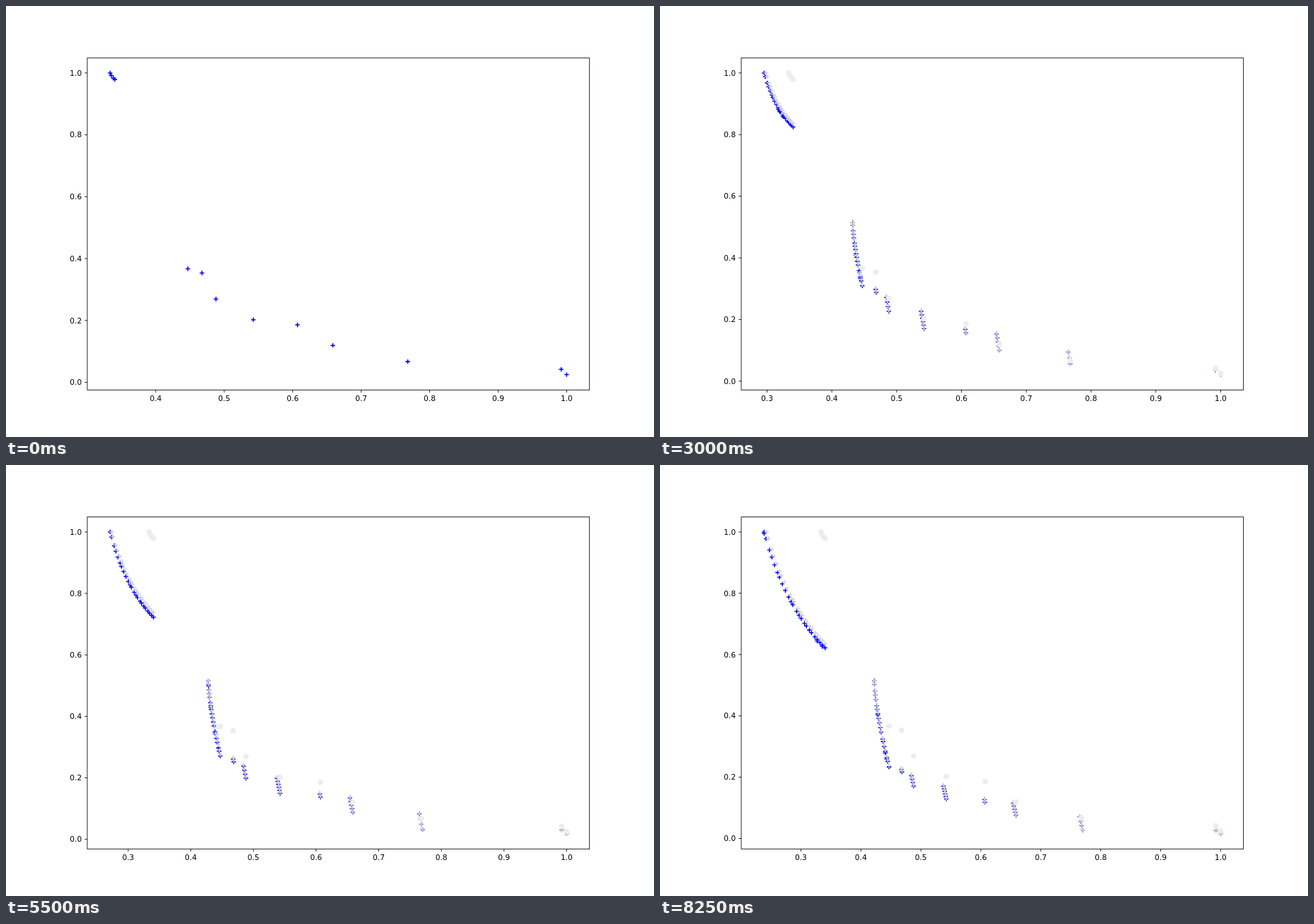
Animation of 917x611 px, one loop 8.5 s. Source, as an HTML page with a canvas:

```html
<!DOCTYPE html>
<html lang="en">
<head>
<meta charset="utf-8">
<title>Advancing front</title>
<style>
  html, body { margin: 0; width: 100%; height: 100%; overflow: hidden; background: #fff; }
  canvas { display: block; }
</style>
</head>
<body>
<canvas id="plot" width="917" height="611"></canvas>
<script>
const ctx = document.getElementById('plot').getContext('2d');
const STEP = 250, FRAMES = 34;
const BOX = { left: 115, top: 73.7, right: 825.7, bottom: 544.3 };
const LEFT_END = .3403, MIDDLE_END = .447, LOWEST = .0255;

// Progress of the front: step, smallest x, height scale
const KEYS = [
  [0, .3335, .979], [9, .3043, .857], [15, .2868, .792], [18, .2793, .768], [19, .2793, .768],
  [24, .2659, .692], [25, .2659, .692], [27, .2595, .677], [28, .2595, .69], [33, .2387, .622]
];

// Small columns: x, height, final count, gap, first step
const COLUMNS = [
  [.4676, .361, 2, -.012, 0], [.488, .275, 4, .018, 0], [.5425, .207, 6, .0135, 0],
  [.607, .19, 2, .014, 0], [.6586, .122, 5, .016, 0], [.768, .0685, 3, .023, 0],
  [.77, .0445, 1, 0, 15], [.992, .043, 1, 0, 0], [1, LOWEST, 1, 0, 0]
];

const mix = (a, b, f) => a + (b - a) * f;
const grow = (from, to, step, pace) => Math.round(mix(to, from, Math.exp(-step / pace)));

function random(n) {
  const r = Math.sin(n * 12.9898) * 43758.5453;
  return r - Math.floor(r);
}

function pose(step) {
  const i = Math.max(1, KEYS.findIndex(key => key[0] >= step));
  const a = KEYS[i - 1], b = KEYS[i], f = (step - a[0]) / (b[0] - a[0]);
  return { xmin: mix(a[1], b[1], f), scale: mix(a[2], b[2], f) };
}

// Uneven steps from 0 to 1; a single step stands at 1
function spread(n, seed) {
  return Array.from({ length: n }, (_, i) => {
    const inner = i > 0 && i < n - 1;
    return n > 1 ? (i + (inner ? (random(seed + i) - .5) * .6 : 0)) / (n - 1) : 1;
  });
}

function front(step) {
  const { xmin, scale } = pose(step);
  const left = spread(grow(4, 24, step, 8), 1).map(u =>
    [mix(xmin, LEFT_END, u), mix(scale, 1, (1 - u) / (1 + .9 * u))]);
  const middle = spread(grow(1, 19, step, 6), 50).map(u =>
    [mix(.382 + .17 * xmin, MIDDLE_END, u ** 1.5), mix(.515, .375 * scale, u)]);
  const columns = COLUMNS.flatMap(([x, q, count, gap, from]) => {
    const n = step < from ? 0 : Math.min(count, 1 + Math.floor((step - from) / 2));
    return Array.from({ length: n }, (_, j) => [x - .07 * gap * j, (q + gap * j) * scale]);
  });
  return [...left, ...middle, ...columns];
}

// A few points of the strands are tried slightly lower for one step
function trials(points, step) {
  return points
    .filter(([x], i) => x < MIDDLE_END && random(step * 31 + i) < .15)
    .map(([x, y]) => [x, y - .005]);
}

function line(x1, y1, x2, y2) {
  ctx.moveTo(x1, y1);
  ctx.lineTo(x2, y2);
}

function plus(x, y, color) {
  ctx.strokeStyle = color;
  ctx.lineWidth = 1.53;
  ctx.beginPath();
  line(x - 3.2, y, x + 3.2, y);
  line(x, y - 3.2, x, y + 3.2);
  ctx.stroke();
}

function dot(x, y, color) {
  ctx.fillStyle = color;
  ctx.beginPath();
  ctx.arc(x, y, 3.8, 0, 2 * Math.PI);
  ctx.fill();
}

function drawAxes(toX, toY) {
  ctx.strokeStyle = ctx.fillStyle = '#000';
  ctx.lineWidth = .85;
  ctx.font = '10.61px "DejaVu Sans", sans-serif';
  ctx.strokeRect(BOX.left, BOX.top, BOX.right - BOX.left, BOX.bottom - BOX.top);
  ctx.beginPath();
  for (let i = 0; i <= 10; i++) {
    const label = (i / 10).toFixed(1), x = toX(i / 10), y = toY(i / 10);
    if (x > BOX.left) {
      line(x, BOX.bottom, x, BOX.bottom + 3.7);
      ctx.textAlign = 'center';
      ctx.fillText(label, x, 559.5);
    }
    if (i % 2 === 0) {
      line(BOX.left, y, BOX.left - 3.7, y);
      ctx.textAlign = 'right';
      ctx.fillText(label, 107.2, y + 3.8);
    }
  }
  ctx.stroke();
}

const start = front(0);

function draw(step) {
  const { xmin, scale } = pose(step), points = front(step);
  const toX = v => 793.4 - (1 - v) / (1 - xmin) * 646;
  const toY = v => 94.9 + (1 - v) / (1 - LOWEST * scale) * 427.7;
  const each = (list, mark, color) => list.forEach(([x, y]) => mark(toX(x), toY(y), color));
  ctx.fillStyle = '#fff';
  ctx.fillRect(0, 0, 917, 611);
  each(points, plus, '#00f');
  if (step > 0) {
    each(trials(points, step), plus, '#00f');
    each(front(step - 1), plus, '#d3d3d3');
    each(start, dot, '#ededed');
  }
  drawAxes(toX, toY);
}

const began = performance.now();
let shown = -1;
function tick() {
  const step = Math.floor((performance.now() - began) / STEP) % FRAMES;
  if (step !== shown) draw(shown = step);
  requestAnimationFrame(tick);
}
tick();
</script>
</body>
</html>
```
